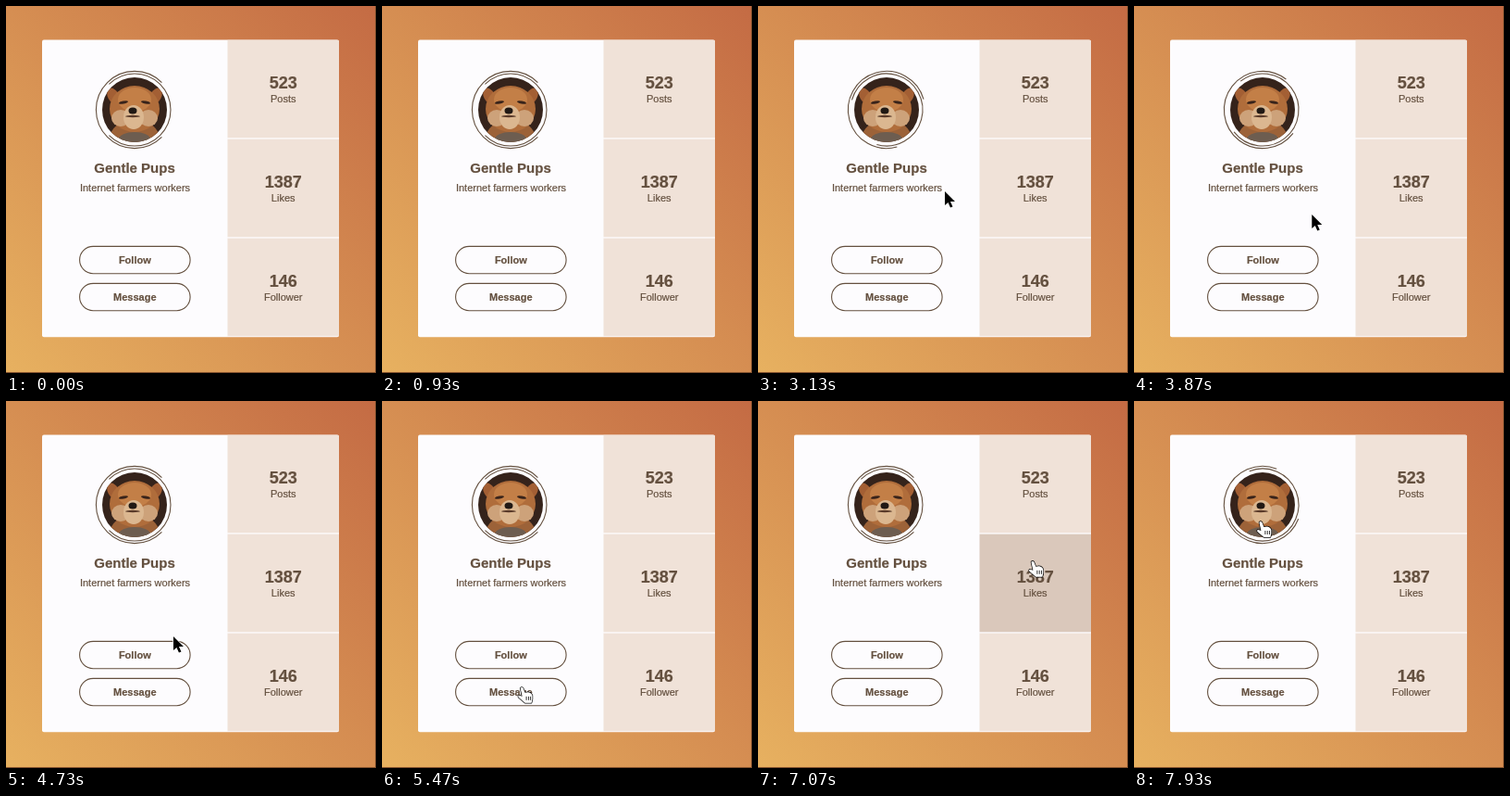
An HTML page with a canvas for the animation above (8000 ms loop, 400 by 396 pixels).

```html
<!DOCTYPE html>
<html lang="en">
<head>
<meta charset="utf-8">
<title>Profile card</title>
<style>
  html, body { margin: 0; width: 100%; height: 100%; overflow: hidden; }
  canvas { display: block; width: 100vw; height: 100vh; }
</style>
</head>
<body>
<canvas></canvas>
<script>
const W = 400, H = 396, LOOP = 8000, SPIN = 1000;
const INK = '#64503f', MID = 139, AVATAR_Y = 112, TAU = 2 * Math.PI;
const STATS = [['523', 'Posts'], ['1387', 'Likes'], ['146', 'Follower']];
const BUTTONS = ['Follow', 'Message'];

// Pointer tip: time, x, y
const STOPS = [
  [1700, 155, -20], [1930, 131, 118], [2900, 146, 135], [3130, 202, 200],
  [4730, 181, 254], [5500, 150, 312], [6070, 235, 317], [6130, 266, 315],
  [7070, 297, 174], [7400, 290, 95], [7930, 137, 131], [LOOP, 137, 131]
];
const ARROW = new Path2D('M0 0V15L3.500 12 6 17.500 8.500 16.500 6 11H11Z');
const HAND = new Path2D('M-1.600 0q1.500-2 3 0l2 5q6-2 8 3v4l-1 4h-7l-7-6q-1-2 1-2l3 1z');

const canvas = document.querySelector('canvas');
const ctx = canvas.getContext('2d');
const scale = window.devicePixelRatio || 1;
canvas.width = W * scale;
canvas.height = H * scale;

const sky = ctx.createLinearGradient(1, 397, 399, -1);
sky.addColorStop(0, '#e7b160');
sky.addColorStop(1, '#c46b44');

const statBox = i => [239.5, 36.6 + 107 * i, 120.5, 105.7];
const buttonBox = i => [79.6, 259.4 + 40 * i, 119.5, 29.3];
const inside = ([x, y], [left, top, w, h]) =>
  x >= left && x < left + w && y >= top && y < top + h;

function fillBox(box, color) {
  ctx.fillStyle = color;
  ctx.fillRect(...box);
}

function text(label, x, y, size = 11, weight = 'normal') {
  ctx.font = `${weight} ${size}px "Liberation Sans", Arial, sans-serif`;
  ctx.textAlign = 'center';
  ctx.fillStyle = ctx.strokeStyle = INK;
  ctx.lineWidth = 0.2;
  ctx.fillText(label, x, y);
  ctx.strokeText(label, x, y);
}

function blob(dx, dy, rx, ry, color, tilt = 0) {
  ctx.beginPath();
  ctx.ellipse(MID + dx, AVATAR_Y + dy, rx, ry, tilt, 0, TAU);
  ctx.fillStyle = color;
  ctx.fill();
}

function ring(radius, turn) {
  ctx.beginPath();
  ctx.arc(MID, AVATAR_Y, radius, turn + TAU / 8, turn + TAU * 7 / 8);
  ctx.strokeStyle = INK;
  ctx.lineWidth = 1.1;
  ctx.stroke();
}

function portrait() {
  ctx.save();
  ctx.beginPath();
  ctx.arc(MID, AVATAR_Y, 35, 0, TAU);
  ctx.clip();
  fillBox([MID - 35, AVATAR_Y - 35, 70, 70], '#35231b');
  blob(0, 32, 27, 22, '#9c6238');
  blob(0, 32, 17, 8, '#6d5d50');
  for (const side of [-1, 1]) blob(side * 23, -15, 6, 9, '#a35f34', side * 0.5);
  blob(0, -1, 27, 25, '#b06d3b');
  blob(0, -11, 18, 13, '#c37f47');
  for (const side of [-1, 1]) {
    blob(side * 15, 9, 10, 9, '#cda27a');
    blob(side * 12, -8, 5, 1.5, '#38231a', side * 0.2);
  }
  blob(-1, 8, 11, 13, '#dbb790');
  blob(-2, 7, 8, 1.2, '#5a3b2a');
  blob(-2, 1, 4.5, 3.5, '#211914');
  ctx.restore();
}

function pointer(t) {
  const i = STOPS.findIndex(([time]) => time > t);
  if (i < 1) return null;
  const [from, to] = [STOPS[i - 1], STOPS[i]];
  const k = (t - from[0]) / (to[0] - from[0]);
  return [1, 2].map(axis => from[axis] + (to[axis] - from[axis]) * k);
}

function drawPointer([x, y], isHand) {
  const shape = isHand ? HAND : ARROW;
  ctx.save();
  ctx.translate(x, y);
  ctx.lineJoin = 'round';
  ctx.lineWidth = 1.3;
  ctx.strokeStyle = isHand ? '#000' : '#fff';
  ctx.fillStyle = isHand ? '#fff' : '#000';
  ctx.stroke(shape);
  ctx.fill(shape);
  if (isHand) {
    for (const finger of [4.5, 6.8, 9.1]) fillBox([finger, 9, 0.8, 4], '#000');
  }
  ctx.restore();
}

function ease(t, start) {
  const k = Math.min(1, Math.max(0, (t - start) / SPIN));
  return k * k * (3 - 2 * k);
}

function draw(t) {
  const tip = pointer(t);
  const over = box => tip !== null && inside(tip, box);
  let isHand = tip !== null && Math.hypot(tip[0] - MID, tip[1] - AVATAR_Y) < 42;

  ctx.setTransform(scale, 0, 0, scale, 0, 0);
  fillBox([0, 0, W, H], sky);
  fillBox([0, H - 1, W, 1], '#85532f');
  fillBox([W - 1, 0, 1, H], '#85532f');

  ctx.save();
  ctx.beginPath();
  ctx.roundRect(39, 36.6, 321, 320.7, 2);
  ctx.clip();
  fillBox([0, 0, W, H], '#fdfcfe');
  STATS.forEach(([count, label], i) => {
    const box = statBox(i), hover = over(box);
    fillBox(box, hover ? '#dac8bb' : '#f0e2d8');
    text(count, 299.7, 89 + 107 * i, 18, 'bold');
    text(label, 299.7, 103.8 + 107 * i);
    isHand ||= hover;
  });
  ctx.restore();

  // Hovering the avatar turns the two rings against each other.
  const turn = TAU * (ease(t, 1880) - ease(t, 2956) + ease(t, 7775));
  ring(41.6, -turn);
  ring(39, TAU / 2 + turn);
  portrait();

  text('Gentle Pups', MID, 180.3, 15, 'bold');
  text('Internet farmers workers', 139.5, 199.8);
  BUTTONS.forEach((label, i) => {
    const box = buttonBox(i);
    ctx.beginPath();
    ctx.roundRect(...box, box[3] / 2);
    ctx.strokeStyle = INK;
    ctx.lineWidth = 1.1;
    ctx.stroke();
    text(label, 139.3, box[1] + 18.4, 11, 'bold');
    isHand ||= over(box);
  });

  if (tip) drawPointer(tip, isHand);
}

const begin = performance.now();
function frame() {
  draw((performance.now() - begin) % LOOP);
  requestAnimationFrame(frame);
}
frame();
</script>
</body>
</html>
```
